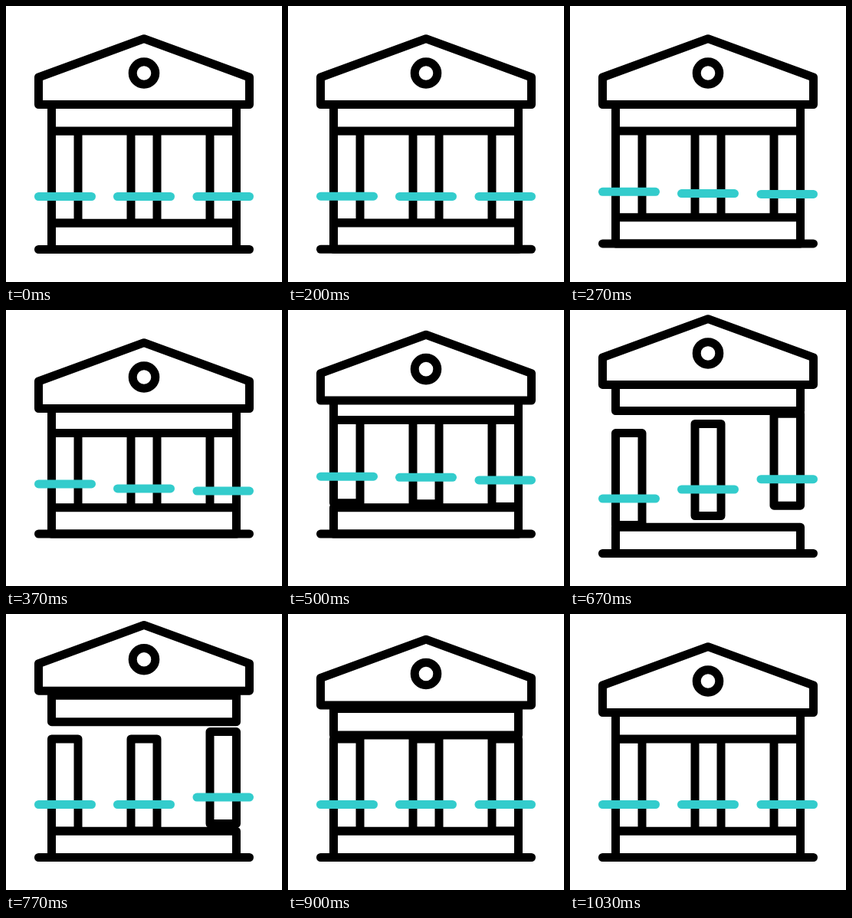
Write an HTML page that moves like this. It is 360 by 360 pixels and loops after 1.67 s.

```html
<!DOCTYPE html>
<html lang="en">
<head>
<meta charset="utf-8">
<title>Bank building</title>
<style>
  html, body { margin: 0; width: 100%; height: 100%; overflow: hidden; background: #fff; }
  svg { display: block; width: 100vw; height: 100vh; }
  g { fill: #fff; stroke: #000; stroke-width: 11; stroke-linecap: round; stroke-linejoin: round; }
  .bar { stroke: #33cccc; }
</style>
</head>
<body>
<svg viewBox="0 0 360 360">
  <g id="left">
    <path d="M59.5 163H94V283H59.5Z"/>
    <path class="bar" d="M42.5 248.5H111.5"/>
  </g>
  <g id="middle">
    <path d="M163 163H197V283H163Z"/>
    <path class="bar" d="M145.5 248.5H214.5"/>
  </g>
  <g id="right">
    <path d="M266 163H300.5V283H266Z"/>
    <path class="bar" d="M249 248.5H317.5"/>
  </g>
  <g id="base">
    <path d="M59.5 283.2H300.5V317.5H59.5Z"/>
    <path d="M42.5 317.5H317.5"/>
  </g>
  <g id="beam">
    <path d="M59.5 128.5H300.5V163H59.5Z"/>
  </g>
  <g id="roof">
    <path d="M42.5 93L180 42.7L317.5 93V128.5H42.5Z"/>
    <circle cx="180" cy="87.5" r="14.8"/>
  </g>
</svg>
<script>
  const LOOP = 1670, STEP = 100 / 3, LIFT = 32;

  // start, peak and landing of each hop, in steps of 1/30 s
  const hops = {
    base:   [5.6, 13.2, 19.4],
    left:   [5.5, 14.4, 21.15],
    middle: [5.6, 16.6, 23],
    right:  [5.55, 18.35, 25.6],
    beam:   [9.35, 19.2, 29.6],
    roof:   [11.3, 21, 30.4]
  };
  const parts = Object.entries(hops).map(([id, hop]) => [document.getElementById(id), hop]);

  const ease = (from, to, n) => {
    const x = Math.min(1, Math.max(0, (n - from) / (to - from)));
    return x * x * (3 - 2 * x);
  };

  function draw(ms) {
    const n = Math.floor((ms % LOOP + 4) / STEP);
    for (const [el, [start, peak, end]] of parts) {
      const y = -LIFT * (ease(start, peak, n) - ease(peak, end, n));
      el.setAttribute("transform", `translate(0 ${y.toFixed(2)})`);
    }
  }

  const begin = performance.now();
  function tick() {
    draw(performance.now() - begin);
    requestAnimationFrame(tick);
  }
  tick();
</script>
</body>
</html>
```
